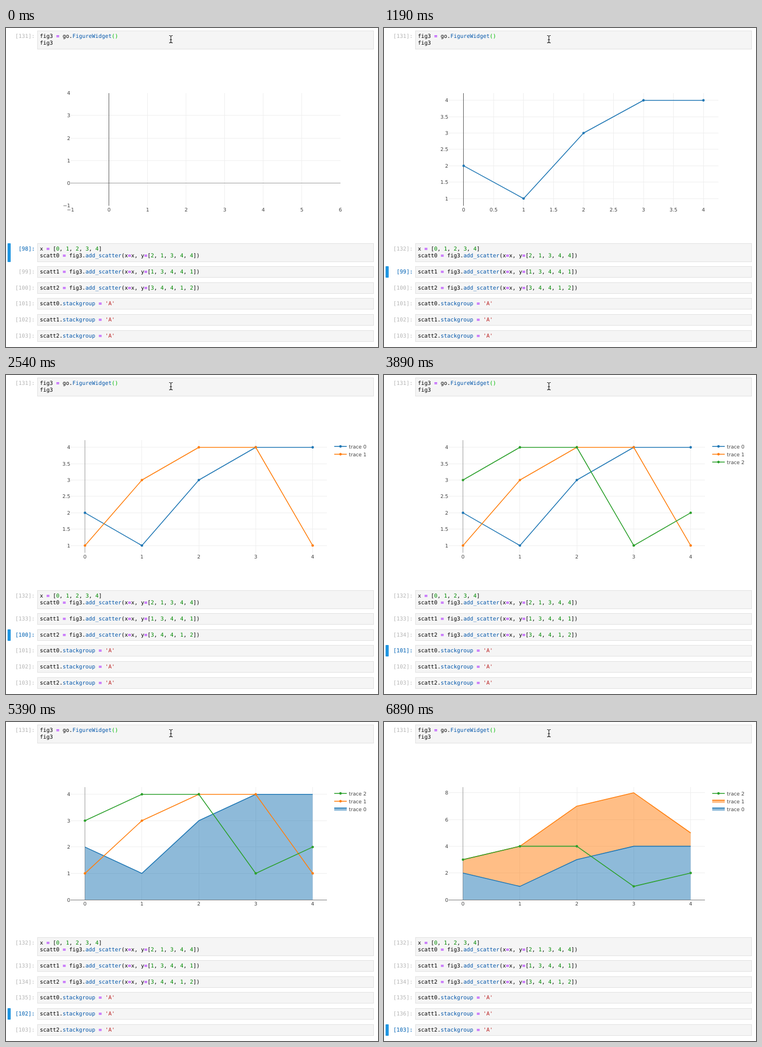
An HTML page for the animation above (8000 ms loop, 714 px wide and 612 px high).

```html
<!DOCTYPE html>
<html lang="en">
<head>
<meta charset="utf-8">
<title>Notebook chart</title>
<style>
html, body { margin: 0; width: 100%; height: 100%; overflow: hidden; background: #fff; }
svg { display: block; width: 100vw; height: 100vh; }
text { white-space: pre; text-rendering: geometricPrecision; }
.code { font: 10.4px "DejaVu Sans Mono", monospace; fill: #000; }
.op { fill: #a2f; font-weight: bold; }
.num { fill: #080; }
.prop { fill: #05a; }
.str { fill: #ba2121; }
.match { fill: #0b0; }
.prompt { fill: #b5b5b5; text-anchor: end; }
.prompt.on { fill: #307fc1; stroke: #307fc1; stroke-width: .25; }
.label { font: 9.6px "DejaVu Sans", sans-serif; fill: #444; }
</style>
</head>
<body>
<svg viewBox="0 0 714 612">
  <rect width="714" height="612" fill="#fff"/>
  <g id="cells"></g>
  <g id="chart"></g>
  <rect id="bar" x="3" width="6" rx="1" fill="#2196e0"/>
  <g fill="none" stroke-linecap="square">
    <path id="halo" stroke="#fff" stroke-width="2.4"/>
    <path id="beam" stroke="#111" stroke-width="1.1"/>
  </g>
</svg>
<script>
const LOOP = 8000;
const STARTS = [0, 1050, 1190, 2540, 3890, 5390, 6890];
const COLORS = ['#1f77b4', '#ff7f0e', '#2ca02c'];
const SERIES = [[2, 1, 3, 4, 4], [1, 3, 4, 4, 1], [3, 4, 4, 1, 2]];
const LEFT = 124, TOP = 125, BOTTOM = 341;

const CELLS = [
  { y: 5, lines: ['fig3 = go.FigureWidget()', 'fig3'] },
  { y: 413, lines: ['x = [0, 1, 2, 3, 4]', 'scatt0 = fig3.add_scatter(x=x, y=[2, 1, 3, 4, 4])'] },
  { y: 457, lines: ['scatt1 = fig3.add_scatter(x=x, y=[1, 3, 4, 4, 1])'] },
  { y: 488, lines: ['scatt2 = fig3.add_scatter(x=x, y=[3, 4, 4, 1, 2])'] },
  { y: 518, lines: ["scatt0.stackgroup = 'A'"] },
  { y: 549, lines: ["scatt1.stackgroup = 'A'"] },
  { y: 580, lines: ["scatt2.stackgroup = 'A'"] }
];

const range = (from, to, step = 1) =>
  Array.from({ length: Math.round((to - from) / step) + 1 }, (_, i) => from + i * step);

// x0, y0: pixel of zero; dx, dy: pixels per unit
const EMPTY = {
  x0: 197.9, dx: 74, y0: 297.4, dy: 43.15, right: 642,
  xt: range(-1, 6), yt: range(-1, 4), xZero: '#555', yZero: '#999'
};
const SINGLE = {
  x0: 152.9, dx: 115.05, y0: 390.05, dy: 62.83, right: 642,
  xt: range(0, 4, .5), yt: range(1, 4, .5), xZero: '#555'
};
const MULTI = { ...SINGLE, x0: 151.6, dx: 109.25, right: 616, xt: range(0, 4), xZero: '#999' };
const STACK1 = { ...MULTI, y0: 341, dy: 50.57, yt: range(0, 4), yZero: '#777' };
const STACK2 = { ...STACK1, dy: 25.65, yt: range(0, 8, 2) };

const VIEWS = [
  { axes: EMPTY, count: 0, stacked: 0 },
  { axes: EMPTY, count: 0, stacked: 0 },
  { axes: SINGLE, count: 1, stacked: 0 },
  { axes: MULTI, count: 2, stacked: 0 },
  { axes: MULTI, count: 3, stacked: 0 },
  { axes: STACK1, count: 3, stacked: 1 },
  { axes: STACK2, count: 3, stacked: 2 }
];

const $ = id => document.getElementById(id);
const crisp = v => Math.floor(v) + .5;
const height = cell => cell.lines.length > 1 ? 36 : 22;
const line = (x1, y1, x2, y2, color, width = 1) =>
  `<path d="M${x1} ${y1}L${x2} ${y2}" stroke="${color}" stroke-width="${width}"/>`;
const label = (x, y, text, anchor) =>
  `<text class="label" x="${x}" y="${y + 3.5}" text-anchor="${anchor}">${String(text).replace('-', '\u2212')}</text>`;
const dot = (x, y, color) => `<circle cx="${x}" cy="${y}" r="2.4" fill="${color}"/>`;

function highlight(src) {
  const classes = ['str', 'op', 'match', 'prop', 'num'];
  return src.replace(/('.*?')|(=)|(\(\))|(?<=\.)([A-Za-z_]+)|\b(\d+)\b/g, (token, ...groups) =>
    `<tspan class="${classes[groups.slice(0, 5).findIndex(Boolean)]}">${token}</tspan>`);
}

function drawCells() {
  $('cells').innerHTML = CELLS.map((cell, i) =>
    `<rect x="60.5" y="${cell.y + .5}" width="645" height="${height(cell) - 1}" fill="#f5f5f5" stroke="#e0e0e0"/>` +
    `<text id="prompt${i}" class="code prompt" x="55.4" y="${cell.y + 14.3}"></text>` +
    cell.lines.map((src, row) =>
      `<text class="code" x="65" y="${cell.y + 14 + row * 13}">${highlight(src)}</text>`).join('')
  ).join('');
}

function drawPrompts(step) {
  const active = Math.max(step, 1) - (step > 1 ? 1 : 0) + (step > 0 ? 1 : 0);
  CELLS.forEach((cell, i) => {
    const done = i < active && step > 1;
    let mark = i === 0 || done ? 131 + i : 97 + i;
    if (step === 1 && i === 1) mark = '*';
    const el = $('prompt' + i);
    el.textContent = `[${mark}]:`;
    el.classList.toggle('on', i === active);
  });
  $('bar').setAttribute('y', CELLS[active].y);
  $('bar').setAttribute('height', height(CELLS[active]));
}

function drawAxes(a, px, py) {
  let out = '';
  const inX = x => x > LEFT + 2 && x < a.right - 2;
  const inY = y => y > TOP + 2 && y < BOTTOM - 2;
  for (const v of a.xt) {
    if (v && inX(px(v))) out += line(crisp(px(v)), TOP, crisp(px(v)), BOTTOM, '#eee');
    out += label(px(v), 348, v, 'middle');
  }
  for (const v of a.yt) {
    if (v && inY(py(v))) out += line(LEFT, crisp(py(v)), a.right, crisp(py(v)), '#eee');
    out += label(123.4, py(v), v, 'end');
  }
  return out;
}

function drawZeros(a, px, py) {
  const x = crisp(px(0)), y = crisp(py(0));
  return (a.yZero ? line(LEFT, y, a.right, y, a.yZero) : '') +
    line(x, TOP, x, BOTTOM, a.xZero);
}

function drawTraces({ count, stacked }, px, py) {
  let fills = '', lines = '';
  let base = [0, 0, 0, 0, 0];
  for (let k = 0; k < count; k++) {
    const filled = k < stacked;
    const values = SERIES[k].map((v, i) => filled ? v + base[i] : v);
    const points = list => list.map((v, i) => [px(i), py(v)]);
    const pts = points(values);
    if (filled) {
      const under = points(base).reverse();
      fills += `<path d="M${pts.concat(under).join('L')}Z" fill="${COLORS[k]}" fill-opacity=".5"/>`;
      base = values;
    }
    lines += `<path d="M${pts.join('L')}" fill="none" stroke="${COLORS[k]}" stroke-width="1.6" stroke-linejoin="round"/>`;
    if (!filled) lines += pts.map(p => dot(...p, COLORS[k])).join('');
  }
  return fills + lines;
}

function drawLegend({ count, stacked }) {
  if (count < 2) return '';
  const order = range(0, count - 1);
  if (stacked) order.reverse();
  return order.map((k, row) => {
    const y = 137 + row * 15, c = COLORS[k];
    const icon = k < stacked
      ? `<rect x="630" y="${y - 2}" width="24" height="5.2" fill="${c}" fill-opacity=".5"/>` + line(630, y - 2, 654, y - 2, c, 1.6)
      : line(630, y, 654, y, c, 1.6) + dot(642, y, c);
    return icon + label(658, y, 'trace ' + k, 'start');
  }).join('');
}

function drawChart(view) {
  const a = view.axes;
  const px = v => a.x0 + v * a.dx;
  const py = v => a.y0 - v * a.dy;
  $('chart').innerHTML = drawAxes(a, px, py) + drawZeros(a, px, py) +
    drawTraces(view, px, py) + drawLegend(view);
}

let shown = -1;
function render(time) {
  const t = time % LOOP;
  const step = STARTS.filter(s => s <= t).length - 1;
  if (step === shown) return;
  shown = step;
  drawPrompts(step);
  drawChart(VIEWS[step]);
}

function tick() {
  render(performance.now() - began);
  requestAnimationFrame(tick);
}

const pointer = 'M313.5 14.5Q316.5 14.5 316.5 16.5V26.5Q316.5 28.5 313.5 28.5M319.5 14.5Q316.5 14.5 316.5 16.5M316.5 26.5Q316.5 28.5 319.5 28.5M315 22.5H318';
$('halo').setAttribute('d', pointer);
$('beam').setAttribute('d', pointer);
drawCells();
const began = performance.now();
tick();
</script>
</body>
</html>
```
